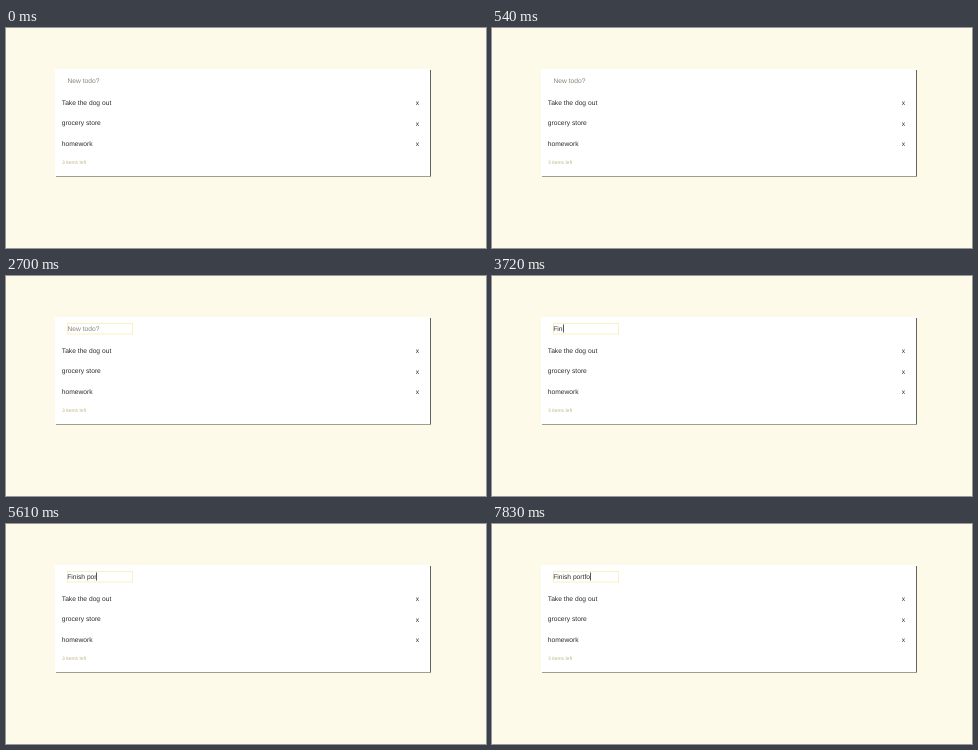
An HTML page for the animation above (8 s loop, 480 px wide and 220 px high).

```html
<!DOCTYPE html>
<html lang="en">
<head>
<meta charset="utf-8">
<title>Todo list</title>
<style>
  html, body { margin: 0; width: 100%; height: 100%; overflow: hidden; background: #fefaea; }
  svg { display: block; }
  text {
    font: 6.7px "Liberation Sans", Arial, sans-serif;
    fill: #2c2c2c;
    white-space: pre;
    text-rendering: geometricPrecision;
  }
  #hint { fill: #85857a; }
  .count { font-size: 5px; fill: #bdb88c; }
  .shade { fill: #62625e; }
  #ring { fill: none; stroke: #faf0c0; }
  #caret { fill: #555; }
</style>
</head>
<body>
<svg width="480" height="220" viewBox="0 0 480 220">
  <rect class="shade" x="50" y="42" width="375" height="106.6"/>
  <rect x="49" y="41" width="375" height="107" fill="#fff"/>

  <rect id="ring" x="61.5" y="47.5" width="65" height="10.5"/>
  <text id="hint" x="61.4" y="55">New todo?</text>
  <text id="entry" x="61.2" y="55"></text>
  <rect id="caret" y="48.5" width="1" height="8"/>

  <text x="55.8" y="76.7">Take the dog out</text>
  <text x="55.8" y="97.4">grocery store</text>
  <text x="55.8" y="117.9">homework</text>
  <text x="409.8" y="76.9">x</text>
  <text x="409.8" y="97.6">x</text>
  <text x="409.8" y="118.1">x</text>
  <text class="count" x="56" y="136.3">3 items left</text>
</svg>
<script>
  const LOOP = 8000;
  const FOCUS = 1860;
  const BLINK = 435;
  const PHRASE = "Finish portfo";
  // When each letter of the phrase is typed
  const KEYS = [3360, 3480, 3600, 3720, 3900, 4350, 4500, 4920, 5130, 5280, 6540, 7680, 7830];

  const [ring, hint, entry, caret] =
    ["ring", "hint", "entry", "caret"].map(id => document.getElementById(id));
  const show = (el, on) => el.setAttribute("visibility", on ? "visible" : "hidden");
  let shown = -1;

  function draw(now) {
    const t = now % LOOP;
    const count = KEYS.filter(key => key <= t).length;
    const focused = t >= FOCUS;
    // Each key press restarts the blink
    const since = t - (count ? KEYS[count - 1] : FOCUS);

    if (count !== shown) {
      entry.textContent = PHRASE.slice(0, count);
      const width = count ? entry.getComputedTextLength() : 0;
      caret.setAttribute("x", Math.floor(61.2 + width));
      shown = count;
    }
    show(ring, focused);
    show(hint, count === 0);
    show(caret, focused && Math.floor(since / BLINK) % 2 === 0);
    requestAnimationFrame(draw);
  }
  draw(performance.now());
</script>
</body>
</html>
```
